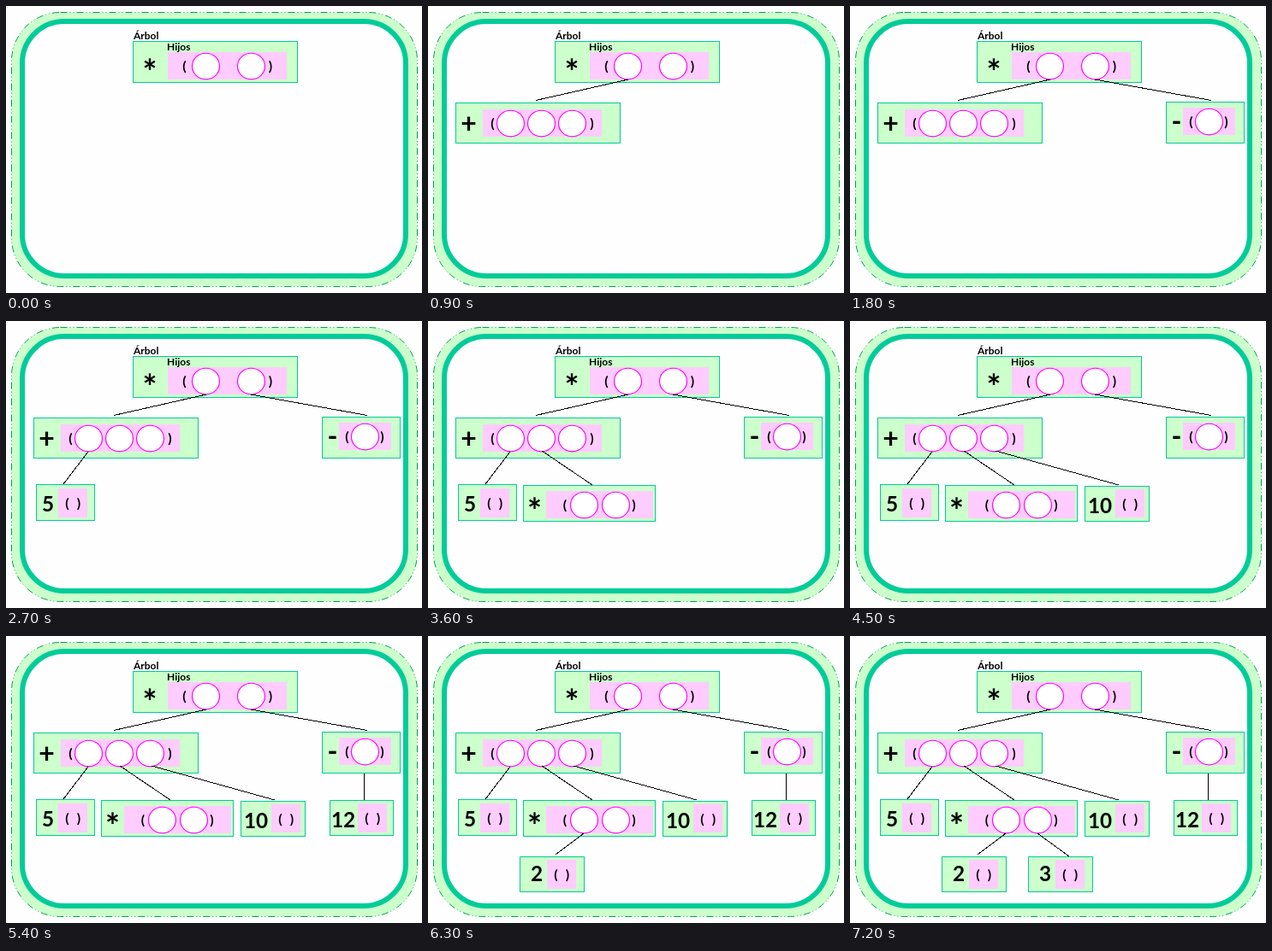
Write an HTML page that moves like this. It is 486 by 336 pixels and loops after 8100 ms.

```html
<!DOCTYPE html>
<html lang="es">
<head>
<meta charset="utf-8">
<title>Árbol</title>
<style>
@property --step { syntax: "<number>"; inherits: true; initial-value: 0; }
@keyframes grow { from { --step: 0; } to { --step: 9; } }
html, body { margin: 0; width: 100%; height: 100%; overflow: hidden; background: #fefefe; }
svg { display: block; width: 486px; height: 336px; animation: grow 8.1s steps(9) -1ms infinite; }
.node { opacity: calc(var(--step) - var(--at) + 1); }
.outer { fill: #cfc; stroke: #00a050; stroke-dasharray: 8 3 1 3 1 3; }
.inner { fill: #fefefe; stroke: #0c9; stroke-width: 6; }
.box { fill: #cfc; stroke: #0c9; }
.kids { fill: #fcf; }
ellipse { fill: #fff; stroke: #f0f; stroke-width: 1.15; }
line { stroke: #000; shape-rendering: crispEdges; }
text { font: 700 12px Lato, "Open Sans", sans-serif; fill: #000; }
.mid { text-anchor: middle; }
</style>
</head>
<body>
<svg id="stage" viewBox="0 0 486 336">
  <rect class="outer" x="6.5" y="7.5" width="474" height="321" rx="57"/>
  <rect class="inner" x="19" y="18" width="448" height="298" rx="49"/>
</svg>
<script>
const stage = document.getElementById('stage');

function add(parent, tag, attrs, content = '') {
  const el = document.createElementNS('http://www.w3.org/2000/svg', tag);
  for (const key in attrs) el.setAttribute(key, attrs[key]);
  el.textContent = content;
  return parent.appendChild(el);
}

function label(parent, content, x, y, size) {
  add(parent, 'text', { class: 'mid', x, y, style: `font-size:${size}px` }, content);
}

// Font size and distance from the glyph's centre down to its baseline
const glyphs = { '*': [40, 22], '+': [32, 11], '-': [32, 9] };
const digits = [24.3, 8.5];

// box and kids: [left, top, right, bottom]; sign: centre; holes: circle centres
const nodes = [
  { sign: '*', at: [168, 69.5], box: [148, 41, 341, 90], kids: [189, 54, 328, 86],
    holes: [233.5, 286.5], cy: 70.5, parens: [208.5, 309] },
  { sign: '+', at: [47.5, 137.5], box: [32, 113, 225, 161], kids: [64, 121, 203, 153],
    holes: [96.5, 132.5, 168.5], cy: 137.5, parens: [75.5, 191.5], link: [234, 86, 126, 110.5] },
  { sign: '-', at: [381.5, 137], box: [369, 112, 461, 161], kids: [389, 119, 450, 151],
    holes: [419.5], cy: 135.5, parens: [398.5, 439.5], link: [286, 86, 422, 110.5] },
  { sign: '5', at: [49, 214], box: [35, 191, 104, 234], kids: [61, 196, 95, 230], link: [96, 153, 67, 191] },
  { sign: '*', at: [124.5, 215], box: [111, 192, 266, 235], kids: [138, 199, 263, 231],
    holes: [182.5, 219.5], cy: 215.5, parens: [160, 240.5], link: [133, 152, 192, 192] },
  { sign: '10', at: [292, 216.5], box: [274, 193, 350, 235], kids: [310, 197, 344, 230], link: [170, 152, 314, 192] },
  { sign: '12', at: [394, 215.5], box: [378, 192, 453, 234], kids: [411, 196, 445, 230], link: [418.5, 161, 418.5, 192] },
  { sign: '2', at: [127, 278], box: [107, 258, 183, 300], kids: [139, 262, 173, 296], link: [182, 231, 149, 256] },
  { sign: '3', at: [228, 278], box: [208, 258, 284, 300], kids: [240, 262, 274, 296], link: [219, 231, 256, 258] }
];

nodes.forEach(({ sign, at, box, kids, holes = [], cy, parens, link }, step) => {
  const g = add(stage, 'g', { class: 'node', style: `--at:${step}` });
  const [l, t, r, b] = box;
  const [kl, kt, kr, kb] = kids;
  add(g, 'rect', { class: 'box', x: l + .5, y: t + .5, width: r - l - 1, height: b - t - 1 });
  add(g, 'rect', { class: 'kids', x: kl, y: kt, width: kr - kl, height: kb - kt });
  for (const cx of holes) add(g, 'ellipse', { cx, cy, rx: 16, ry: 15.3 });

  const [size, drop] = glyphs[sign] || digits;
  label(g, sign, at[0], at[1] + drop, size);

  const [open, close] = parens || [kl + 10.5, kl + 24];
  const base = holes.length ? cy + 5.5 : kt + 22.5;
  label(g, '(', open, base, 16);
  label(g, ')', close, base, 16);

  if (link) {
    const [x1, y1, x2, y2] = link;
    add(g, 'line', { x1, y1, x2, y2 });
  }
});

add(stage, 'text', { x: 149, y: 39 }, 'Árbol');
add(stage, 'text', { x: 188, y: 52 }, 'Hijos');
</script>
</body>
</html>
```
